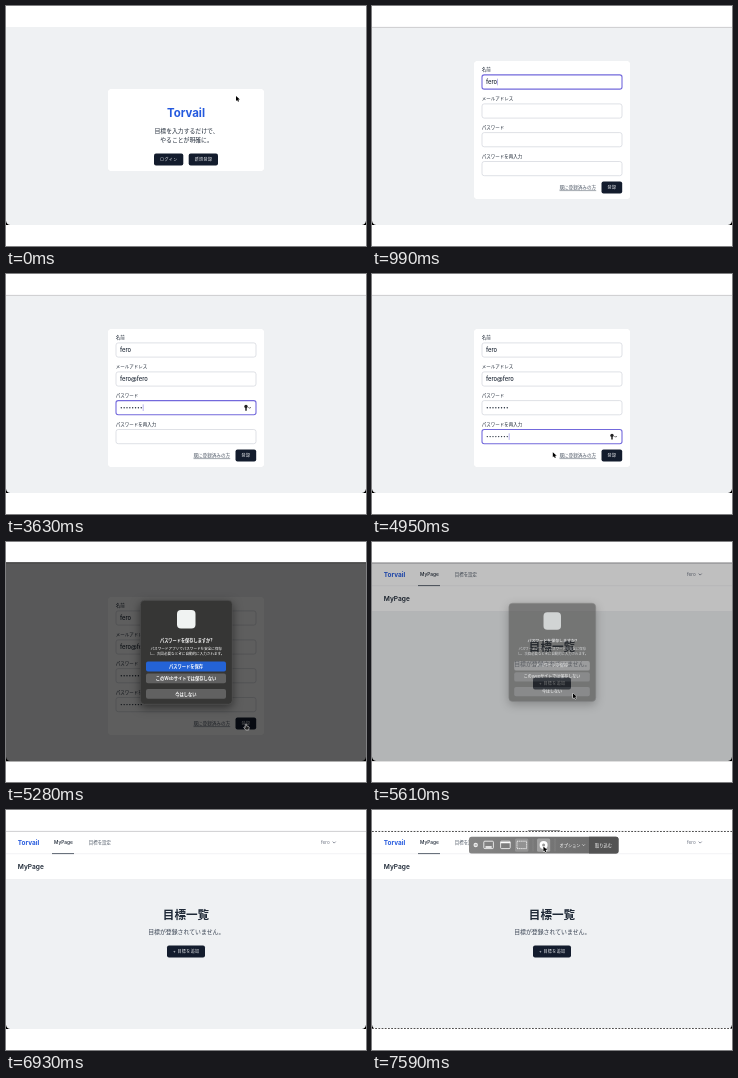
An HTML page for the animation above (7920 ms loop, 360 px wide and 240 px high).

```html
<!DOCTYPE html>
<html lang="ja">
<head>
<meta charset="utf-8">
<title>目標一覧</title>
<style>
  html, body { margin: 0; width: 100%; height: 100%; overflow: hidden; background: #fff; }
  svg { display: block; width: 100%; height: 100%; }
  text { font-family: Inter, "Noto Sans CJK JP", "Noto Sans CJK", sans-serif; fill: #1f2937; }
  .mid { text-anchor: middle; }
  .brand { fill: #2459de; font-weight: 700; }
  .card { fill: #fff; filter: drop-shadow(0 .7px .7px rgba(0, 0, 0, .1)); }
  .dark { fill: #131c2d; }
  .label { font-size: 4.5px; font-weight: 500; }
  .value { font-size: 5.8px; font-weight: 500; }
  .button { font-size: 4px; font-weight: 500; letter-spacing: .4px; fill: #eef0f3; text-anchor: middle; }
  .field { fill: #fff; stroke: #d1d5db; stroke-width: .7; }
  .field.on { stroke: #7369dc; stroke-width: 1.1; }
  .dots { stroke: #1f2937; stroke-width: 1.4; stroke-linecap: round; stroke-dasharray: 0 2.85; }
  .white text { fill: #fff; text-anchor: middle; }
  .line { fill: none; stroke: #fff; stroke-width: .8; }
  #dialog { filter: drop-shadow(0 3px 5px rgba(0, 0, 0, .5)); }
</style>
</head>
<body>
<svg viewBox="0 0 360 240">
  <linearGradient id="metal"><stop stop-color="#858585"/><stop offset="1" stop-color="#686868"/></linearGradient>
  <rect y="21" width="360" height="198" fill="#eff1f3"/>

  <g id="landing">
    <rect class="card" x="102" y="83" width="156" height="82" rx="2.5"/>
    <text class="brand mid" x="180" y="111" font-size="11.4">Torvail</text>
    <g class="mid" font-size="5.85">
      <text x="180.5" y="126.6">目標を入力するだけで、</text>
      <text x="180.5" y="136.2">やることが明確に。</text>
    </g>
    <rect class="dark" x="148" y="147.5" width="29.3" height="12" rx="2"/>
    <rect class="dark" x="182.7" y="147.5" width="29.3" height="12" rx="2"/>
    <text class="button" x="162.8" y="155">ログイン</text>
    <text class="button" x="197.5" y="155">新規登録</text>
  </g>

  <g id="form">
    <rect class="card" x="102" y="55" width="156" height="138" rx="2.5"/>
    <g id="fields"></g>
    <text id="name" class="value" x="114" y="78.2"></text>
    <text id="mail" class="value" x="114" y="107"></text>
    <path id="pass" class="dots"/>
    <path id="again" class="dots"/>
    <path id="caret" stroke="#7369dc" stroke-width=".5"/>
    <g id="person">
      <circle cx="239.3" cy="105" r="2.3" fill="#222"/>
      <circle cx="239.3" cy="104.2" r=".8" fill="#fff"/>
      <path d="M237.9 106.5q1.4-1.5 2.8 0" fill="#fff"/>
      <path d="M242.6 104.4l1.2 1.2 1.2-1.2" fill="none" stroke="#222" stroke-width=".8"/>
    </g>
    <g id="key">
      <circle cx="240" cy="-1.2" r="1.7" fill="#222"/>
      <path d="M240 0v3" stroke="#222" stroke-width="1.5"/>
      <path d="M242.5-.5l1.1 1.1 1.1-1.1" fill="none" stroke="#222" stroke-width=".8"/>
    </g>
    <text x="187.4" y="183" font-size="4.6" style="fill:#4b5563">既に登録済みの方</text>
    <path d="M187.5 184.6h36.7" stroke="#4b5563" stroke-width=".5"/>
    <rect class="dark" x="229.5" y="175.5" width="20.7" height="12" rx="2"/>
    <text class="button" x="240" y="183">登録</text>
  </g>

  <g id="page">
    <rect class="card" y="21" width="360" height="48.3"/>
    <path d="M0 43.7h360" stroke="#eceef1" stroke-width=".7"/>
    <path d="M46 43.6h22" stroke="#4b5563" stroke-width=".9"/>
    <text class="brand" x="11.8" y="34.8" font-size="6.4">Torvail</text>
    <text x="48" y="34.1" font-size="4.8" font-weight="500">MyPage</text>
    <text x="82.8" y="34" font-size="4.45" style="fill:#4b5563">目標を設定</text>
    <text x="315" y="33.9" font-size="4.6" style="fill:#6b7280">fero</text>
    <path d="M326.7 31.6l1.5 1.5 1.5-1.5" fill="none" stroke="#6b7280" stroke-width=".8"/>
    <text x="11.8" y="59" font-size="6.6" font-weight="600">MyPage</text>
    <text class="mid" x="180" y="108.9" font-size="11.6" font-weight="700">目標一覧</text>
    <text class="mid" x="180.3" y="124.3" font-size="5.9" style="fill:#374151">目標が登録されていません。</text>
    <rect class="dark" x="161" y="135.5" width="38" height="12" rx="2"/>
    <text class="button" x="180.2" y="143">+ 目標を追加</text>
  </g>

  <path id="edge" d="M0 21.4h360" stroke="#c9cacc" stroke-width=".9"/>
  <rect id="shade" y="20" width="360" height="199.5"/>
  <path d="M0 219v-4.5a4.5 4.5 0 0 0 4.5 4.5zM360 219v-4.5a4.5 4.5 0 0 1-4.5 4.5z"/>

  <g id="dialog" class="white">
    <rect x="134.3" y="58.3" width="92" height="104" rx="4" fill="#363635" stroke="#5c5c5c" stroke-width=".5"/>
    <rect x="171" y="68" width="18.5" height="18.5" rx="4" fill="#f0f3f2"/>
    <text x="180.3" y="99.5" font-size="4.2" font-weight="700">パスワードを保存しますか?</text>
    <g font-size="3.58" font-weight="500">
      <text x="180.3" y="107.8">パスワードアプリでパスワードを安全に保存</text>
      <text x="181" y="113">し、次回必要なときに自動的に入力されます。</text>
    </g>
    <g fill="#616161">
      <rect id="save" x="140" y="119.6" width="80" height="10" rx="2"/>
      <rect x="140" y="131.5" width="80" height="9.8" rx="2"/>
      <rect x="140" y="147" width="80" height="9.8" rx="2"/>
    </g>
    <g font-size="4.25" font-weight="600">
      <text x="180" y="126.2">パスワードを保存</text>
      <text x="180" y="138">このWebサイトでは保存しない</text>
      <text x="180" y="153.5">今はしない</text>
    </g>
  </g>

  <g id="capture" class="white">
    <path d="M156 21h32" stroke="#333"/>
    <path d="M0 21.5h360M0 218.5h360" stroke="#fff"/>
    <path d="M0 21.5h360M0 218.5h360" stroke="#222" stroke-width=".8" stroke-dasharray="1.8 1.4"/>
    <rect x="97" y="26.7" width="149.5" height="16.8" rx="2.5" fill="url(#metal)"/>
    <path d="M217 26.7h27a2.5 2.5 0 0 1 2.5 2.5v11.8a2.5 2.5 0 0 1-2.5 2.5h-27z" fill="#535353"/>
    <circle cx="103.7" cy="35" r="2.2" fill="#eee"/>
    <path d="M102.9 34.2l1.6 1.6m0-1.6l-1.6 1.6" stroke="#666" stroke-width=".5"/>
    <rect x="143" y="28.4" width="13.4" height="13.4" rx="1.5" fill="#929292"/>
    <rect x="165" y="28.4" width="13.2" height="13.4" rx="1.5" fill="#a2a2a2"/>
    <g class="line">
      <rect x="111.8" y="31.2" width="9.6" height="7.4" rx="1"/>
      <path d="M113.5 37h6.2M128.6 32.6h9.6" stroke-width="1.4"/>
      <rect x="128.6" y="31.2" width="9.6" height="7.4" rx="1"/>
      <rect x="145" y="31.2" width="9.6" height="7.4" stroke-dasharray="1.4 .7"/>
      <path d="M210.3 34.4l1.3 1.3 1.3-1.3" stroke-width=".6"/>
    </g>
    <path d="M161 28.5v13M183 28.5v13" stroke="#8c8c8c" stroke-width=".5"/>
    <circle cx="171.6" cy="35" r="4" fill="#fff"/>
    <circle cx="171.6" cy="35" r="1.5" fill="#999"/>
    <text x="198" y="36.6" font-size="4.2">オプション</text>
    <text x="231.5" y="36.6" font-size="4.2">取り込む</text>
  </g>

  <g id="arrow"><path d="M0 0v5l1.2-1.1.8 1.8 1-.4-.8-1.8h1.7z" stroke="#fff" stroke-width=".9" paint-order="stroke"/></g>
  <g id="beam"><path d="M-1-2.8q1 0 1 .7v4.2q0 .7-1 .7M1-2.8q-1 0-1 .7v4.2q0 .7 1 .7" fill="none" stroke="#222" stroke-width=".6"/></g>
  <g id="hand"><path d="M-.7 3V.2q.7-1 1.4 0V2l2 .6q.6.2.5 1L2.7 6H-.3L-2.2 3.6q0-.9.8-.6l.7.6z" fill="#222" stroke="#ddd" stroke-width=".6"/></g>
</svg>

<script>
const STEP = 330;
const ROWS = [76, 105, 133.7, 162.6];
const $ = id => document.getElementById(id);
const show = (id, on) => { $(id).style.display = on ? '' : 'none'; };

$('fields').innerHTML = ['名前', 'メールアドレス', 'パスワード', 'パスワードを再入力'].map((label, i) => `
  <text class="label" x="109.8" y="${ROWS[i] - 10.8}">${label}</text>
  <rect class="field" x="110" y="${ROWS[i] - 7.1}" width="140" height="14.2" rx="2.2"/>`).join('');
const fields = document.querySelectorAll('.field');

// Each step lists what changes; the pointer shows only in steps that place it.
const steps = [
  { scene: 'landing', edge: false, focus: -1, name: '', mail: '', pass: 0, again: 0, shade: 0, dialog: 0,
    arrow: [230, 90] },
  { edge: true, hand: [198, 155] },
  { scene: 'form', focus: 0, arrow: [158.6, 81.5] },
  { name: 'fero' },
  { focus: 1, beam: [138, 105] },
  { mail: 'fero' },
  { mail: 'fero@' },
  { mail: 'fero@fero', arrow: [138.3, 119] },
  { focus: 2, beam: [142.8, 138] },
  { pass: 2 },
  { pass: 5 },
  { pass: 8 },
  { focus: 3, beam: [139.8, 164] },
  { again: 2 },
  { again: 6 },
  { again: 8, arrow: [180.8, 178.3] },
  { focus: -1, shade: .63, dialog: 1, hand: [240, 182] },
  { scene: 'page', shade: .25, dialog: .5, arrow: [201, 151.3] },
  { shade: 0, dialog: 0, arrow: [250.5, 96.8] },
  {}, {}, {}, {},
  { capture: true, arrow: [171.4, 36.6] }
];
const POINTERS = ['arrow', 'beam', 'hand'];
let state = {};
const states = steps.map(step => {
  state = { ...state, arrow: null, beam: null, hand: null, ...step };
  return state;
});

function setDots(id, row, count) {
  show(id, count);
  $(id).setAttribute('d', `M115.3 ${ROWS[row]}h${Math.max(0, count - 1) * 2.85 + .1}`);
}

function draw(s) {
  ['landing', 'form', 'page'].forEach(id => show(id, s.scene === id));
  show('edge', s.edge);
  show('capture', s.capture);
  POINTERS.forEach(id => {
    show(id, s[id]);
    if (s[id]) $(id).setAttribute('transform', `translate(${s[id]})`);
  });

  fields.forEach((field, i) => field.classList.toggle('on', i === s.focus));
  $('name').textContent = s.name;
  $('mail').textContent = s.mail;
  setDots('pass', 2, s.pass);
  setDots('again', 3, s.again);

  show('person', s.focus === 1);
  show('key', s.focus > 1);
  show('caret', s.focus >= 0);
  if (s.scene === 'form' && s.focus >= 0) {
    const y = ROWS[s.focus];
    const width = s.focus < 2
      ? $(s.focus ? 'mail' : 'name').getComputedTextLength()
      : s[s.focus === 2 ? 'pass' : 'again'] * 2.85;
    $('caret').setAttribute('d', `M${114.4 + width} ${y - 3.3}v6.6`);
    $('key').setAttribute('transform', `translate(0 ${y})`);
  }

  $('shade').style.opacity = s.shade;
  $('dialog').style.opacity = s.dialog;
  const closing = s.dialog < 1;
  $('dialog').setAttribute('transform', `translate(180.3 110.3) scale(${closing ? .945 : 1}) translate(-180.3 -110.3)`);
  $('save').style.fill = closing ? '#858585' : '#2463d6';
}

let shown = -1;
function tick() {
  const index = Math.floor(performance.now() / STEP) % states.length;
  if (index !== shown) draw(states[shown = index]);
  requestAnimationFrame(tick);
}
tick();
</script>
</body>
</html>
```
